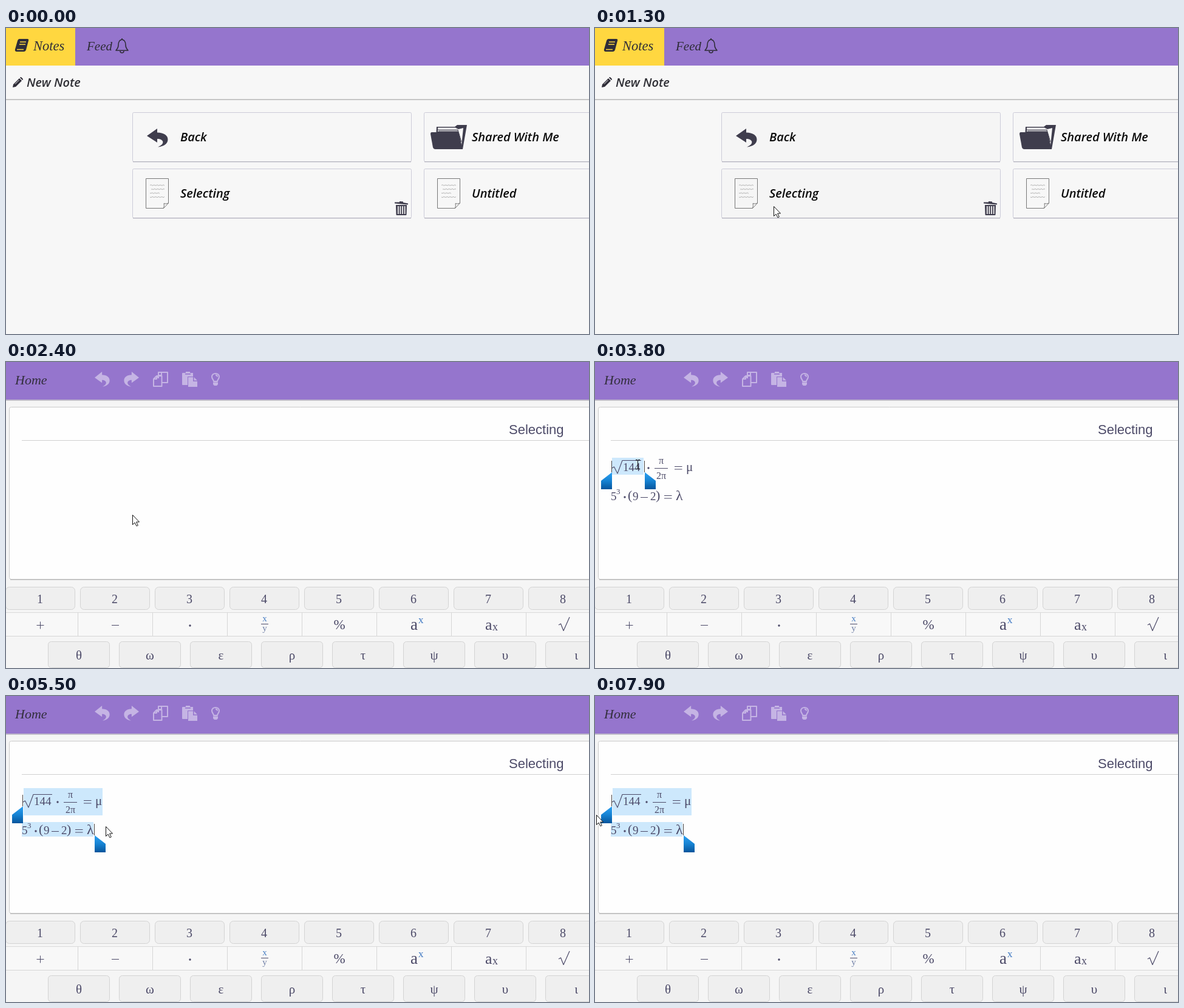
An HTML page with a canvas for the animation above (8 s loop, 960 px wide and 505 px high).

```html
<!DOCTYPE html>
<html lang="en">
<head>
<meta charset="utf-8">
<title>Selecting</title>
<style>
html, body { margin: 0; width: 100%; height: 100%; overflow: hidden; background: #f6f6f6; }
canvas { display: block; width: 960px; height: 505px; }
</style>
</head>
<body>
<canvas id="stage" width="960" height="505"></canvas>
<script>
const ctx = document.getElementById('stage').getContext('2d');
const LOOP = 8000, STEP = 100;
const PURPLE = '#9575cd', DARK = '#3f3d4d', INK = '#4c4a68', PALE = '#c5b4e4';
const SERIF = '"Liberation Serif", serif';
const LABEL = 'italic 600 20px "Open Sans", "Noto Sans", sans-serif';
const script = size => `italic ${size}px ${SERIF}`;

function rect(x, y, w, h, color) {
  ctx.fillStyle = color;
  ctx.fillRect(x, y, w, h);
}

function box(x, y, w, h, r, fill, stroke) {
  ctx.beginPath();
  ctx.roundRect(x + .5, y + .5, w - 1, h - 1, r);
  ctx.fillStyle = fill;
  ctx.fill();
  ctx.strokeStyle = stroke;
  ctx.lineWidth = 1;
  ctx.stroke();
}

function text(s, x, y, font, color, align = 'left') {
  ctx.font = font;
  ctx.fillStyle = color;
  ctx.textAlign = align;
  ctx.fillText(s, x, y);
}

function math(s, x, y, size, align, color = INK) {
  text(s, x, y, `${size}px ${SERIF}`, color, align);
}

function fill(d, color) {
  ctx.fillStyle = color;
  ctx.fill(new Path2D(d));
}

function line(d, color, width = 1) {
  ctx.strokeStyle = color;
  ctx.lineWidth = width;
  ctx.lineJoin = 'round';
  ctx.stroke(new Path2D(d));
}

function at(x, y, draw, sx = 1, sy = sx) {
  ctx.save();
  ctx.translate(x, y);
  ctx.scale(sx, sy);
  draw();
  ctx.restore();
}

function dot(x, y, r = 1.7) {
  ctx.beginPath();
  ctx.arc(x, y, r, 0, 7);
  ctx.fillStyle = INK;
  ctx.fill();
}

// ---- icons ----

const replyArrow = color =>
  fill('M0 12L17 0V6.5C28 7 34.5 11 34.5 18C34.5 25 28 29.5 18 30.5C25 27.5 28 23.5 25.5 20C23.5 17.5 20 17 17 17V23Z', color);

function book() {
  fill('M7 0H20Q23 0 22 3L18 18Q17 21 14 21H3Q-1 21 0 17L4 3Q5 0 7 0Z', '#2f2d38');
  line('M8 5H18M7 9H17M3 17.5H14', '#ffd740', 1.4);
}

function bell() {
  line('M11 2C6 3 5 7 5 11C5 15 3 18 1 20H21C19 18 17 15 17 11C17 7 16 3 11 2ZM11 0V2M8 21C8 25 14 25 14 21', '#2f2d38', 1.6);
}

function pencil() {
  fill('M0 17L1 12L11 2L15 6L5 16ZM12 1Q13 -1 15 1L16 2Q18 4 16 5Z', '#2f2d38');
  line('M4 11.5L10.5 5', '#f7f7f7', 1);
}

function folder() {
  fill('M10 3H40L44 0H60L53 40H8Z', DARK);
  fill('M12 4.5H41L46 7L54 5L51 34L46 11H12Z', '#f7f7f7');
  line('M12 8H45L51 28M13 10H45', DARK, 1);
  fill('M2 12H44Q46 12 47 14L52 37Q52 40 49 40H8Q5 40 4 37L0 15Q0 12 2 12Z', DARK);
}

function page() {
  line('M.5 .5H37.5V41L29.5 49.5H.5ZM37.5 41Q33 43 30 41.5Q31 45 29.5 49.5', '#777', 1);
  const rows = [[7, 32], [9, 31], [7, 24], [7, 32]];
  rows.forEach(([a, b], i) => {
    const y = 11.5 + i * 6.5;
    let d = `M${a} ${y}`;
    for (let x = a + 2; x <= b; x += 2) d += `L${x} ${y + Math.sin(x * 1.9 + i) * .8}`;
    line(d, '#a4a4a4', .8);
  });
}

function trash() {
  fill('M0 1.5L8 1.5V0L14 .5V2L22 3.5V5.5L0 3.5ZM2 6H20L19.5 22Q19.5 23 18.5 23H3.5Q2.5 23 2.5 22Z', DARK);
  line('M5.8 8V21M9.4 8V21M13 8V21M16.6 8V21', '#f2f2f2', 1.8);
}

function copyIcon() {
  line('M10 5V6L5.5 11M9 11V1H14V6H8.5M14 1H24V18H15M6 7V12H1V24H14.5V7H6L1 12', PALE, 2);
}

function pasteIcon() {
  fill('M1 2H6V0H13V2H18V8H9V22H1Q0 22 0 21V3Q0 2 1 2ZM10 9H18V16H25V25H10ZM19.5 9L25 14.5H19.5Z', PALE);
  rect(5, 3, 9, 1.6, PURPLE);
}

function bulb() {
  line('M4 14C4 11 1 10 1 6.5C1 -1 13 -1 13 6.5C13 10 10 11 10 14ZM7 3.5Q10 3.5 10 6.5', PALE, 2);
  fill('M3 15.5H11V19L9 21H5L3 19Z', PALE);
}

// ---- note list ----

function card(x, y, label, shade) {
  box(x, y, 460, 82, 2, shade, '#cccbd8');
  rect(x + 1, y + 81, 458, 1, '#b6b5c0');
  rect(x + 1, y + 82, 458, 1, '#dcdce2');
  text(label, x + 79, y + 48, LABEL, '#0c0c0c');
}

function noteList(t) {
  const shade = t < 500 ? '#f7f7f7' : '#f5f5f5';
  rect(0, 0, 960, 505, '#f7f7f7');
  rect(0, 0, 960, 62, PURPLE);
  rect(0, 0, 114, 62, '#ffd740');
  at(15, 18, book);
  text('Notes', 45, 37, script(22.5), '#2f2d38');
  text('Feed', 133, 37, script(21), '#2f2d38');
  at(180, 17, bell);
  at(11, 81, pencil);
  text('New Note', 34, 97, LABEL, '#2f2f35');
  rect(0, 117, 960, 1, '#d0d0d0');
  rect(0, 118, 960, 1, '#bcbcbc');
  card(208, 139, 'Back', shade);
  card(688, 139, 'Shared With Me', '#f7f7f7');
  card(208, 232, 'Selecting', shade);
  card(688, 232, 'Untitled', '#f7f7f7');
  at(232, 166, () => replyArrow(DARK));
  at(699, 160, folder);
  at(230, 248, page);
  at(710, 248, page);
  at(640, 286, trash);
}

function splash() {
  rect(0, 0, 960, 505, '#f5f5f5');
  text('The Tallier', 603, 344, script(34), '#777');
}

// ---- editor ----

function keyboard() {
  for (let i = 0; i < 8; i++) {
    const x = 123 * i, gx = 69 + 117 * i;
    box(x - 1, 371, 115, 38, 6, '#efefef', '#d3d3d3');
    math(String(i + 1), x + 56, 398, 20, 'center');
    box(gx, 461, 102, 44, 5, '#efefef', '#d3d3d3');
    math('θωερτψυι'[i], gx + 51, 491, 21, 'center');
  }
  rect(0, 413, 960, 40, '#f8f8f8');
  rect(0, 413, 960, 1, '#dadada');
  rect(0, 452, 960, 1, '#d6d6d6');
  for (let x = 118; x < 960; x += 123) rect(x, 413, 1, 40, '#d6d6d6');
  line('M50.5 434.5H62.5M56.5 428.5V440.5M174 434.5H186', INK);
  dot(303, 435);
  math('x', 426, 428, 15, 'center', '#4a7fc4');
  rect(420, 432, 12, 1, INK);
  math('y', 426, 444, 15, 'center', '#6f7fa6');
  math('%', 549, 441, 23, 'center');
  math('a', 666, 442, 27);
  math('x', 679, 431, 17, 'left', '#3f78c2');
  math('a', 789, 442, 26);
  math('x', 801, 443, 18);
  line('M910 434L913.5 432L918 443.5L928 421', INK, 1.2);
}

function frame() {
  rect(0, 0, 960, 505, '#f5f5f5');
  rect(0, 0, 960, 62, PURPLE);
  rect(0, 62, 960, 2, '#c0bcc9');
  text('Home', 15, 37, script(22), '#332f3d');
  at(146, 16, () => replyArrow(PALE), 25 / 35, 25 / 31);
  at(219, 16, () => replyArrow(PALE), -25 / 35, 25 / 31);
  at(242, 16, copyIcon);
  at(290, 16, pasteIcon);
  at(338, 18, bulb);
  box(5, 74, 970, 285, 3, '#fefefe', '#cacaca');
  rect(7, 358, 953, 2, '#c4c4c4');
  text('Selecting', 828, 119, '22px "Liberation Sans", sans-serif', INK);
  rect(26, 129, 934, 1, '#d0d0d0');
  keyboard();
}

const equals = (x, y) => line(`M${x} ${y}h12.5m0 4.5h-12.5`, INK);

// Parts behind the caret give way by its width.
function formulas(sel) {
  const shift = (row, x) => sel && sel.row === row && x >= sel.stop ? 3 : 0;
  const part = (row, x, draw) => draw(x + shift(row, x));
  line('M28 175L31.5 173L37 184L45 162.5H76', INK, 1.1);
  math('144', 46, 180, 19);
  part(1, 85, x => dot(x, 175));
  part(1, 95, x => {
    math('π', x + 11, 168, 16, 'center');
    rect(x, 175, 22, 1, INK);
    math('2π', x + 11, 193, 16, 'center');
  });
  part(1, 128, x => equals(x, 172.5));
  part(1, 147, x => math('μ', x, 180, 21));
  math('5', 26, 228, 19);
  part(2, 35, x => math('3', x, 218, 13));
  part(2, 49, x => dot(x, 223));
  part(2, 54, x => math('(', x, 227, 22));
  part(2, 62, x => math('9', x, 228, 19));
  part(2, 75, x => line(`M${x} 223.5h12`, INK));
  part(2, 91, x => math('2', x, 228, 19));
  part(2, 100, x => math(')', x, 227, 22));
  part(2, 114, x => equals(x, 220.5));
  part(2, 133, x => math('λ', x, 228, 24));
}

// ---- motion ----

const PATH = [
  [400, 674, 62], [700, 400, 388], [800, 311, 335], [1000, 292, 312], [1200, 284, 300],
  [1300, 294, 294], [2300, 294, 294], [2400, 208, 252], [2500, 137, 194], [2600, 137, 194],
  [2900, 80, 176], [3100, 29, 171], [3300, 70, 169], [3800, 70, 169], [3900, 92, 187],
  [4000, 96, 187], [4400, 168, 187], [4600, 168, 187], [4900, 156, 236], [5400, 156, 236],
  [5500, 164, 215], [5600, 163, 224], [5700, 158, 240], [6000, 156, 243], [6100, 156, 243],
  [6500, 91, 238], [6600, 91, 238], [6800, 144, 231], [7000, 151, 233], [7200, 161, 218],
  [7300, 161, 218], [7400, 148, 238], [7700, 24, 222], [7900, 2, 196]
];

function pointer(t) {
  const i = PATH.findIndex(p => p[0] > t);
  if (i < 0) return PATH[PATH.length - 1].slice(1);
  const [t0, x0, y0] = PATH[i - 1], [t1, x1, y1] = PATH[i];
  const k = (t - t0) / (t1 - t0);
  return [x0 + (x1 - x0) * k, y0 + (y1 - y0) * k];
}

const STOPS = {
  1: [80, 90, 119, 143, 160],
  2: [33, 42, 52, 61, 72, 89, 100, 107, 132, 144]
};

function selection(t) {
  if (t < 3800) return null;
  const row = t < 4800 ? 1 : 2;
  const drag = t >= 4000 && t < 4400 || t >= 4700 && t < 4900 || t >= 6200 && t < 7000;
  const last = STOPS[row][STOPS[row].length - 1];
  if (!drag) {
    const stop = t < 4000 ? 80 : last;
    return { row, stop, x: stop + 2, y: row === 1 ? 182 : 230 };
  }
  const [px, py] = pointer(t), x = px - 12, y = row === 1 && t < 4400 ? 182 : py - 13;
  const stop = t >= 4700 && t < 4900 ? last : STOPS[row].filter(s => s < x).pop();
  return { row, stop, x, y };
}

function highlight({ row, stop }) {
  const tint = '#cde8fc';
  if (row === 2) {
    rect(29, 152, 130, 45, tint);
    const top = stop < 144 ? 210 : 208;
    rect(26, top, stop - 26, 232 - top, tint);
  } else if (stop > 90) rect(29, 152, stop - 29, 45, tint);
  else rect(28, 158, stop - 28, 28, tint);
}

function handle(x, y, dir) {
  at(x, y, () => {
    const g = ctx.createLinearGradient(0, 0, 0, 28);
    g.addColorStop(0, '#2ba0f2');
    g.addColorStop(.5, '#1683d3');
    g.addColorStop(1, '#07559c');
    fill('M0 0L18 14V28H0Z', g);
  }, dir, 1);
}

function carets({ row, stop, x, y }) {
  rect(27, 163, 1, 19, '#444');
  rect(stop + 1, row === 1 ? 163 : 211, 1, 19, '#444');
  handle(28, 182, -1);
  handle(x, y, 1);
}

function cursor(t) {
  if (t < 400) return;
  const [x, y] = pointer(t).map(Math.round);
  const outlined = d => {
    fill(d, '#fff');
    line(d, '#111', 1);
  };
  at(x, y, () => {
    if (t >= 2800 && t < 3900) {
      line('M-3 -7.5H0M1 -7.5H4M.5 -7V7M-3 7.5H0M1 7.5H4', '#111', 1);
    } else if (t >= 3900 && t < 5500 || t >= 5700 && t < 7100) {
      outlined('M-1.5 1.5Q0 -.5 1.5 1.5V8Q3.5 6.5 4.5 8.5Q6.5 7.5 7.5 9.5Q9.5 9 10 11.5V16Q10 18 8 20V23.5H-1V21L-5.5 14Q-6.5 11.5 -4 12L-1.5 14.5Z');
    } else {
      outlined('M.5 .5V16.5L4 13L7 18.8L9.3 17.6L6.6 12H11.5Z');
    }
  });
}

function draw(t) {
  if (t < 1800) noteList(t);
  else if (t < 2300) splash();
  else {
    frame();
    const sel = selection(t);
    if (sel) highlight(sel);
    if (t >= 2500) formulas(sel);
    if (sel) carets(sel);
  }
  cursor(t);
}

const start = performance.now();
function tick() {
  const t = (performance.now() - start) % LOOP;
  draw(Math.floor(t / STEP) * STEP);
  requestAnimationFrame(tick);
}
tick();
</script>
</body>
</html>
```
